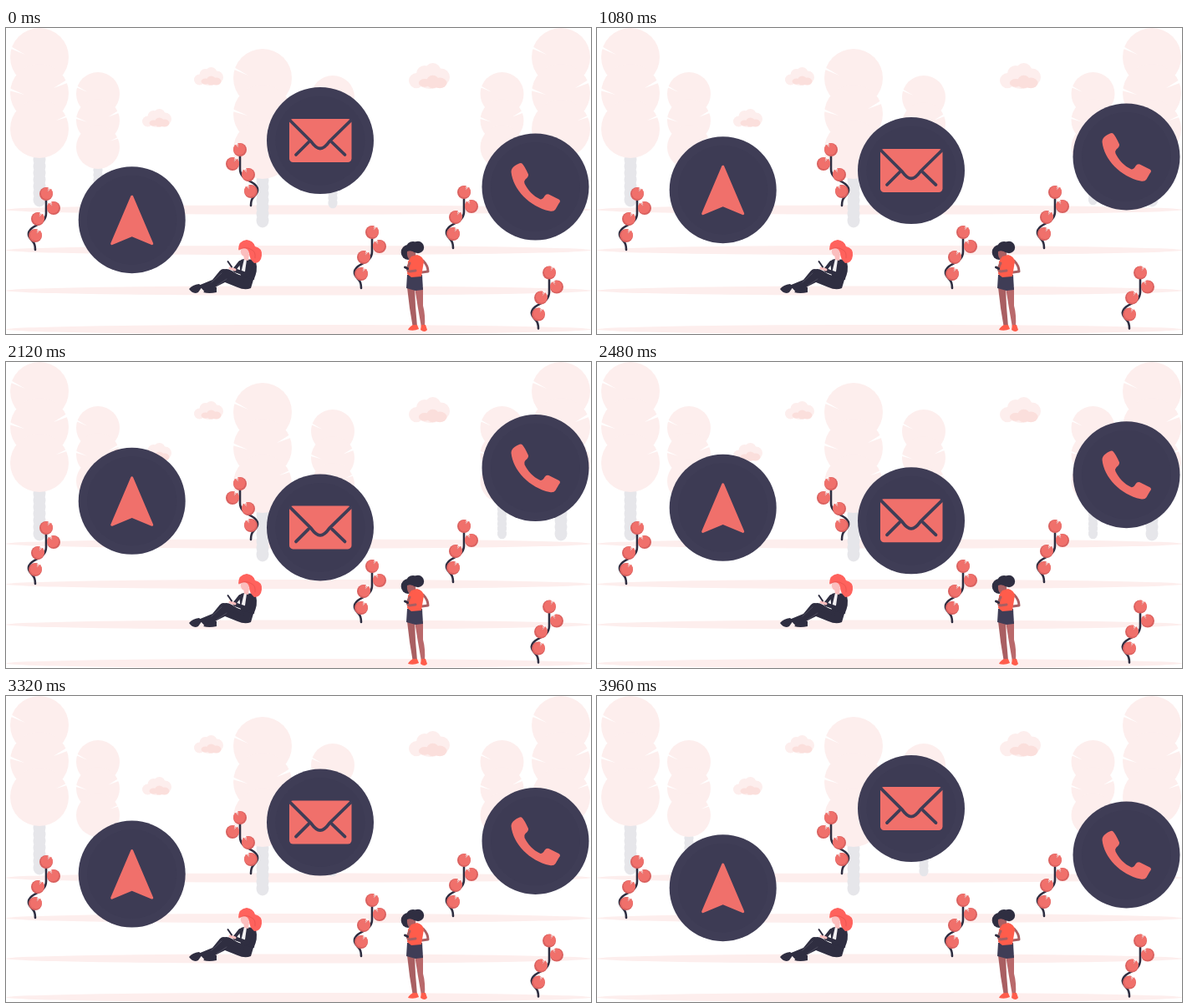
An HTML page with a canvas for the animation above (4 s loop, 700x367 px).

```html
<!DOCTYPE html>
<html lang="en">
<head>
<meta charset="utf-8">
<title>Floating contact icons</title>
<style>
html, body { margin: 0; width: 100%; height: 100%; overflow: hidden; background: #fff; }
canvas { display: block; width: 700px; height: 367px; }
</style>
</head>
<body>
<canvas id="stage" width="700" height="367"></canvas>
<script>
const ctx = document.getElementById('stage').getContext('2d');
const LOOP = 4000, STEP = 40, RISE = 64;
const NAVY = '#3f3d56', INK = '#2f2e41', CORAL = '#f0706b', SHADE = '#d9615f';
const BLUSH = '#fdeeed', ROSE = '#fbdfdc', TRUNK = '#e6e6ea';
const SKIN = '#fbbebe', BROWN = '#a95f62', RED = '#ff5c4b';

function fill(d, color) {
  ctx.fillStyle = color;
  ctx.fill(new Path2D(d));
}

function line(d, color, width) {
  ctx.strokeStyle = color;
  ctx.lineWidth = width;
  ctx.stroke(new Path2D(d));
}

function oval(x, y, rx, color, ry = rx) {
  ctx.fillStyle = color;
  ctx.beginPath();
  ctx.ellipse(x, y, rx, ry, 0, 0, Math.PI * 2);
  ctx.fill();
}

function at(x, y, draw, sx = 1, sy = sx) {
  ctx.save();
  ctx.translate(x, y);
  ctx.scale(sx, sy);
  draw();
  ctx.restore();
}

// Origin: top centre of the crown; unit size has radius 35.
function tree() {
  for (let y = 150; y <= 207; y += 8) oval(0, y, 7.5, TRUNK, 8.5);
  for (const y of [35, 78, 121]) oval(0, y, 35, BLUSH);
  fill('M-36 21L-17 32L-36 24Z M36 60L17 72L36 65Z M-36 72L-18 80L-36 75Z M36 103L20 111L36 106Z', '#fff');
}

function cloud() {
  oval(-11, 4, 6.5, BLUSH);
  oval(-4, -2, 7, BLUSH);
  oval(3, -4, 7, BLUSH);
  oval(10, 1, 7.5, BLUSH);
  oval(1, 5, 11, BLUSH, 6);
  oval(3, 5, 5.5, ROSE);
  oval(9, 6, 6, ROSE, 4.5);
  oval(-4, 6, 5, ROSE, 3.5);
}

function berry(x, y, side) {
  at(x, y, () => {
    oval(0, 0, 8, SHADE);
    oval(0.8, -0.8, 7, CORAL);
    fill('M3 -8.5L1.5 -2L6 -7Z', '#fff');
    line('M1.6 -2.5L3.6 -6', SHADE, 0.8);
  }, side, 1);
}

// Origin: centre of the top berry.
function plant() {
  line('M0 0V23C0 34 -10 36 -17 41C-24 47 -21 52 -16 57C-13 60 -13 63 -13 67', INK, 2.6);
  berry(0, 0, 1);
  berry(9, 17, -1);
  berry(-10, 30, 1);
  berry(-13, 50, 1);
}

function sitter() {
  fill('M279 280Q283 275 291 278L299 280Q302 292 296 302L293 312Q286 315 277 311L262 305L250 311L238 317L235 313L247 305L258 291Q263 287 270 291L281 298Z', INK);
  fill('M264 291L282 297L286 304L266 299L252 306L236 314L230 309L247 302L256 291Q260 287 264 291Z', INK);
  fill('M219 313Q223 308 231 307L235 310L230 317Q224 320 219 313Z', INK);
  fill('M236 317Q241 313 247 309L252 311L252 317Q243 319 236 317Z', INK);
  line('M246 305L258 294M252 309L264 301', '#575566', 0.7);
  fill('M285 277L289 278L286 297L281 294Z', '#f4f1f4');
  fill('M288 278Q296 276 299 281L297 302L285 299Z', INK);
  line('M293 282L289 296L275 291', INK, 5);
  line('M280 281L273 290', INK, 4);
  line('M274 290L268 288', SKIN, 3);
  line('M265.5 280L270 286.5', INK, 2);
  oval(286, 268, 5.2, SKIN, 6);
  fill('M284 271L291 271L290 279L285 278Z', SKIN);
  fill('M278 266Q278 255 288 254Q296 255 298 262Q307 264 306 273Q305 282 297 282Q291 277 291 270Q290 264 284 264Z', '#ff625d');
  line('M279 266Q286 261 294 266Q299 268 298 276', '#e9524f', 0.8);
}

function stander() {
  fill('M480 311L489 311L490 334L492 358L487 360L483 336Z', BROWN);
  fill('M489 311L499 311L499 333Q502 344 501 359L497 359L493 336Z', '#b9696b');
  fill('M487 356L492 356L494 361Q488 364 481 362Q482 359 487 356Z', RED);
  fill('M497 356L502 356L504 362Q501 366 496 362Z', RED);
  fill('M480 296L498 296L499 314L490 315L479 312Z', NAVY);
  line('M499 279Q505 285 505 292L498 293', BROWN, 3);
  oval(493, 263, 7.2, INK);
  oval(481, 269, 8.3, INK, 9);
  oval(487, 263, 8, INK, 7);
  fill('M480 268Q485 266 490 270L491 277L484 279Q479 275 480 268Z', BROWN);
  fill('M485 274L492 272Q499 274 500 280L497 298L485 299L480 295L481 280Z', RED);
  line('M483 282Q478 291 483 292L490 291', BROWN, 3);
  line('M477.5 287L480.5 288.5', INK, 3);
}

function arrow() {
  const d = 'M0 -28L24 28.5L0 18.5L-24 28.5Z';
  fill(d, CORAL);
  line(d, CORAL, 3);
}

function mail() {
  ctx.fillStyle = CORAL;
  ctx.beginPath();
  ctx.roundRect(-37, -26, 74.5, 52, 4.5);
  ctx.fill();
  line('M-36 -24L-11 1Q-5 9.5 0 9.5Q5 9.5 11 1L36.5 -24', NAVY, 3.8);
  line('M-14 2L-29 17M14 2L29.5 17', NAVY, 3.8);
}

function phone() {
  fill('M-25 -25Q-18 -30 -16 -28Q-13 -25 -8.5 -15Q-8 -12 -12 -9Q-14 -7 -13 -4C-9 4 -3 11 6 15Q9 15 11 11Q13 8 16 9L28 15Q31 17 28 20L24 27Q22 30 17 29C-7 24 -27 3 -29 -18Q-29 -22 -25 -25Z', CORAL);
}

function badge(x, y, icon) {
  at(x, y, () => {
    oval(0, 0, 64, NAVY);
    oval(0, 0, 53.5, '#3d3b54');
    icon();
  });
}

function scene(t) {
  ctx.fillStyle = '#fff';
  ctx.fillRect(0, 0, 700, 367);
  ctx.lineCap = ctx.lineJoin = 'round';

  for (const y of [218, 266.5, 315, 361.5]) oval(350, y, 350, BLUSH, 5.6);

  const small = 26 / 35;
  for (const [x, y, s] of [[40, 0, 1], [110, 53, small], [307, 25, 1], [391, 57, small], [593.5, 53, small], [664, 0, 1]]) {
    at(x, y, tree, s);
  }
  at(180.5, 108, cloud);
  at(242.5, 58, cloud);
  at(506.5, 57.5, cloud, 1.4);

  const shift = RISE * (1 - Math.cos(t / LOOP * Math.PI * 2)) / 2;
  badge(150.7, 230.2 - shift, arrow);
  badge(376, 135 + shift, mail);
  badge(633.5, 190.5 - shift, phone);

  at(280, 146, plant, -1, 1);
  for (const [x, y] of [[48, 199], [438, 245], [548, 197], [650, 293.5]]) at(x, y, plant);
  sitter();
  stander();
}

function tick() {
  scene(Math.floor(performance.now() % LOOP / STEP) * STEP);
  requestAnimationFrame(tick);
}
tick();
</script>
</body>
</html>
```
